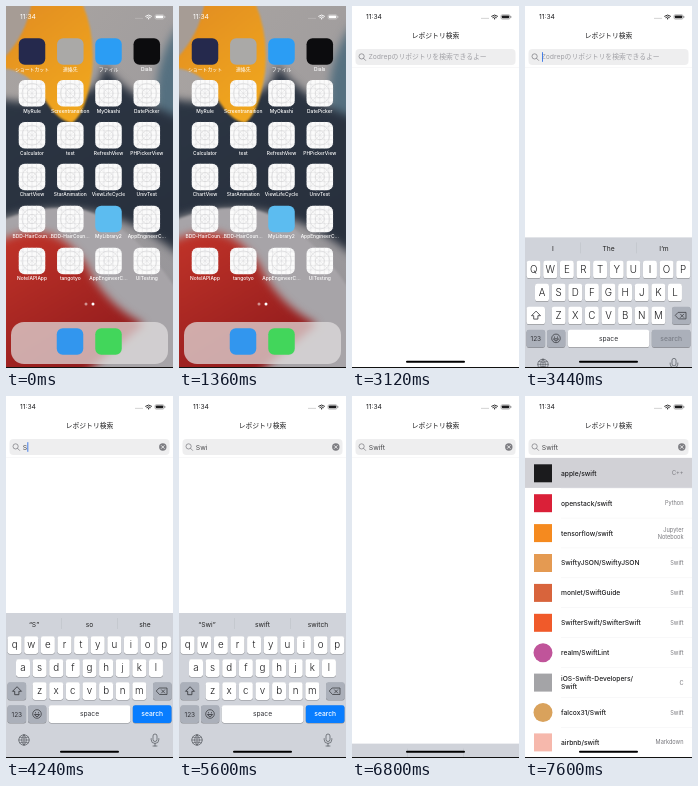
Write an HTML page that moves like this. It is 167 by 362 pixels and loops after 8000 ms.

```html
<!DOCTYPE html>
<html lang="ja">
<head>
<meta charset="utf-8">
<title>Repository search</title>
<style>
html, body { margin: 0; width: 100%; height: 100%; overflow: hidden; background: #fff; }
svg { display: block; width: 100vw; height: 100vh; }
text { font-family: Inter, "Noto Sans CJK JP", "Noto Sans CJK", sans-serif; white-space: pre; }
.soft { filter: blur(1px); }
.softer { filter: blur(4px); }
</style>
</head>
<body>
<svg id="stage" viewBox="0 0 167 362" preserveAspectRatio="none"></svg>
<script>
const LOOP = 8000, STEP = 80, W = 167, H = 362;
const stage = document.getElementById('stage');
const $ = id => document.getElementById(id);
const set = (id, attrs) => {
  for (const k in attrs) $(id).setAttribute(k, attrs[k]);
};
const toggle = (id, on) => set(id, { display: on ? 'inline' : 'none' });

const rect = (x, y, w, h, fill, r = 0, more = '') =>
  `<rect x="${x}" y="${y}" width="${w}" height="${h}" rx="${r}" fill="${fill}" ${more}/>`;
const circle = (x, y, r, fill, more = '') =>
  `<circle cx="${x}" cy="${y}" r="${r}" fill="${fill}" ${more}/>`;
const shape = (d, fill, more = '') => `<path d="${d}" fill="${fill}" ${more}/>`;
const line = (d, color, width = 0.7, more = '') =>
  `<path d="${d}" fill="none" stroke="${color}" stroke-width="${width}" stroke-linecap="round" stroke-linejoin="round" ${more}/>`;
const text = (s, x, y, size, fill, anchor = 'middle', more = '') =>
  `<text x="${x}" y="${y}" font-size="${size}" fill="${fill}" text-anchor="${anchor}" ${more}>${s}</text>`;
const gradient = (id, from, to) =>
  `<linearGradient id="${id}" x2=".6" y2="1"><stop stop-color="${from}"/><stop offset="1" stop-color="${to}"/></linearGradient>`;

// Critically damped spring from 0 to 1
const spring = (ms, rate) => {
  const x = Math.max(0, ms) * rate;
  return 1 - (1 + x) * Math.exp(-x);
};
const mix = (a, b, p) => a + (b - a) * p;

function statusBar(color) {
  return text('11:34', 22, 13.4, 6.7, color) +
    [130, 132, 134, 136].map(x => circle(x, 12.3, 0.5, color, 'opacity=".5"')).join('') +
    line('M139.6 10.2q3-2.6 6 0M140.8 11.5q1.8-1.6 3.6 0', color, 0.9) + circle(142.6, 12.8, 0.7, color) +
    rect(149, 8.7, 9, 4.4, 'none', 1.3, `stroke="${color}" stroke-width=".5" opacity=".6"`) +
    rect(149.8, 9.5, 7.4, 2.8, color, 0.7) + rect(158.6, 10.2, 0.6, 1.5, color);
}

// Home screen
const COLS = [26, 64.3, 102.5, 140.8];
const ICON = 26.5;
const LABELS = [
  'ショートカット', '連絡先', 'ファイル', 'Dials',
  'MyRule', 'Screentransition', 'MyOkashi', 'DatePicker',
  'Calculator', 'test', 'RefreshView', 'PHPickerView',
  'ChartView', 'StarAnimation', 'ViewLifeCycle', 'UnivTest',
  'BDD-HairCoun…', 'BDD-HairCoun…', 'MyLibrary2', 'AppEngineerC…',
  'NotelAPIApp', 'tangotyo', 'AppEngineerC…', 'UITesting'
];
const TILE_COLORS = { 0: '#25294d', 1: '#aaa9a7', 2: '#2b9df4', 3: '#0c0c0e', 18: '#5cbcf0' };

const tile = (x, y, fill) => rect(x - ICON / 2, y - ICON / 2, ICON, ICON, fill, 6);

function gridTile(x, y) {
  let d = '';
  for (const k of [-9, -4.5, 0, 4.5, 9]) d += `M${x + k} ${y - 13}v26M${x - 13} ${y + k}h26`;
  const ring = r => circle(x, y, r, 'none', 'stroke="#c9c9cc" stroke-width=".45"');
  return tile(x, y, '#fbfbfb') +
    line(d + `M${x - 11} ${y - 11}l22 22m0 -22l-22 22`, '#d6d6d9', 0.4) + ring(4.5) + ring(10);
}

function wallpaper() {
  return rect(0, 0, W, H, 'url(#grey)') +
    shape('M175 15Q142 60 152 125H175Z', '#557080', 'class="softer"') +
    shape('M-8 92Q30 102 58 84Q92 96 98 58Q122 92 175 112V250Q90 180 -8 214Z', 'url(#navy)', 'class="softer"') +
    shape('M-8 50Q14 36 26 -8H74Q90 26 86 66Q80 108 66 117Q48 114 34 84Q18 62 -8 62Z', 'url(#orange)', 'class="soft"') +
    shape('M-8 -8H26Q22 30 -8 58Z', '#a69c95', 'class="soft"') +
    shape('M-8 216Q40 196 78 204Q130 220 175 290V370H-8Z', '#a7a4a8', 'class="soft"') +
    shape('M-8 236Q46 208 80 258Q98 298 138 318Q100 350 70 375H-8Z', 'url(#red)', 'class="softer"');
}

function homeScreen() {
  let icons = '', labels = '';
  LABELS.forEach((name, i) => {
    const x = COLS[i % 4], y = 45.4 + 41.9 * Math.floor(i / 4);
    icons += TILE_COLORS[i] ? tile(x, y, TILE_COLORS[i]) : gridTile(x, y);
    labels += text(name, x, y + 19.3, 4.9, '#fff', 'middle', 'font-weight="500"');
  });
  return wallpaper() +
    rect(5, 316, 157, 42, '#e2e0e0', 13, 'opacity=".72"') +
    `<g id="icons">${icons}${tile(64, 335.5, '#3296ee')}${tile(102.5, 335.5, '#42d65b')}</g>` +
    `<g id="labels">${labels}${circle(80, 298, 1.5, '#fff', 'opacity=".5"')}${circle(87, 298, 1.5, '#fff')}</g>` +
    statusBar('#fff') + rect(0, 0, W, H, '#000', 0, 'id="dim"');
}

// Search results: name, language, avatar colour, round avatar
const ROWS = [
  ['apple/swift', 'C++', '#1b1b1d'],
  ['openstack/swift', 'Python', '#da2038'],
  ['tensorflow/swift', 'Jupyter|Notebook', '#f58a1f'],
  ['SwiftyJSON/SwiftyJSON', 'Swift', '#e49a52'],
  ['monlet/SwiftGuide', 'Swift', '#d8643c'],
  ['SwifterSwift/SwifterSwift', 'Swift', '#f05a2a'],
  ['realm/SwiftLint', 'Swift', '#c0549a', true],
  ['iOS-Swift-Developers/|Swift', 'C', '#a4a4a7'],
  ['falcox31/Swift', 'Swift', '#d9a25c', true],
  ['airbnb/swift', 'Markdown', '#f6b8ac']
];
const PITCH = 29.9;

function results() {
  let names = '', avatars = '';
  const block = (s, x, y, size, fill, anchor, gap, weight) => {
    const parts = s.split('|');
    return parts.map((part, i) =>
      text(part, x, y + size * 0.36 + (i - (parts.length - 1) / 2) * gap, size, fill, anchor,
        `font-weight="${weight}"`)).join('');
  };
  ROWS.forEach(([name, lang, color, round], i) => {
    const y = 77.3 + PITCH * i;
    names += block(name, 36, y, 6.7, '#1c1c1e', 'start', 8.6, 500) +
      block(lang, 158.5, y, 5.6, '#77777c', 'end', 7.2, 400) +
      rect(36, y + PITCH / 2 - 0.3, 131, 0.4, '#ededef');
    avatars += round ? circle(18, y, 9.5, color) : rect(9, y - 9, 18, 18, color);
  });
  return `<g id="list">${rect(0, 62, W, PITCH, '#d1d1d6', 0, 'id="selected"')}${names}</g><g id="avatars">${avatars}</g>`;
}

// Keyboard
const KEYS = {};
['qwertyuiop', 'asdfghjkl', 'zxcvbnm'].forEach((row, r) => {
  [...row].forEach((key, i) => {
    KEYS[key] = { x: [8.6, 17, 33.6][r] + 16.62 * i, y: 249 + 23 * r };
  });
});
const keycap = (x, y, w, fill, id = '') =>
  rect(x, y - 8.2, w, 17.7, '#898b90', 2.3) + rect(x, y - 8.7, w, 17.6, fill, 2.3, id);

function keyboard() {
  let s = rect(0, 217, W, 146, '#d0d3da');
  for (const i of [0, 1, 2]) s += text('', 28 + 55.5 * i, 231, 6.7, '#222', 'middle', `id="hint${i}"`);
  s += rect(55.6, 222, 0.4, 11, '#b7bac1') + rect(111, 222, 0.4, 11, '#b7bac1');
  for (const k in KEYS) {
    const { x, y } = KEYS[k];
    s += keycap(x - 7, y, 14, '#fff') + text(k, x, y + 3.3, 9.8, '#1c1c1e', 'middle', `id="key-${k}" font-weight="300"`);
  }
  const grey = '#abb0ba', ink = '#303136';
  return s + keycap(1.5, 295, 18.6, grey, 'id="shift"') + keycap(147, 295, 18.6, grey) +
    keycap(1.5, 318, 18.6, grey) + keycap(22, 318, 18.3, grey) +
    keycap(42.8, 318, 81.5, '#fff') + keycap(126.8, 318, 38.7, grey, 'id="go"') +
    line('M10.8 291l-4.3 4.3h2.2v3.4h4.2v-3.4h2.2z', ink, 0.8) +
    line('M153.5 292h7.5v6.5h-7.5l-3-3.2zM155.5 293.8l3.2 3.2m0 -3.2l-3.2 3.2', ink, 0.7) +
    text('123', 10.8, 320.6, 6.5, ink) + text('space', 83.5, 320.3, 6.7, ink) +
    text('search', 146.2, 320.3, 6.7, '#fff', 'middle', 'id="goText" font-weight="500"') +
    circle(31, 318, 4.3, 'none', `stroke="${ink}" stroke-width=".7"`) +
    line('M28.7 318.8q2.3 4 4.6 0zM29.5 316.6v.3M32.5 316.6v.3', ink, 0.8) +
    circle(18, 344, 5.2, 'none', 'stroke="#50535a" stroke-width=".7"') +
    line('M12.8 344h10.4M18 338.8v10.4M18 338.8q-5 5.2 0 10.4q5 -5.2 0 -10.4M13.8 341.2q4.2 1.6 8.4 0M13.8 346.8q4.2 -1.6 8.4 0', '#50535a', 0.6) +
    rect(147, 338, 4, 7.5, 'none', 2, 'stroke="#50535a" stroke-width=".7"') +
    line('M145.2 342.6v1.2q0 3.6 3.8 3.6t3.8 -3.6v-1.2M149 347.4v2.6m-2 0h4', '#50535a', 0.7) +
    '<g id="popup">' +
    shape('M-7 9V-8Q-7 -11 -10 -13Q-11.5 -15 -11.5 -17V-29Q-11.5 -32 -8.5 -32H8.5Q11.5 -32 11.5 -29V-17Q11.5 -15 10 -13Q7 -11 7 -8V9Z',
      '#fff', 'stroke="#b9bcc3" stroke-width=".4"') +
    text('', 0, -16, 15, '#1c1c1e', 'middle', 'id="popupText" font-weight="300"') + '</g>';
}

function searchPage() {
  const glass = '#85858a';
  return '<g id="page">' +
    text('レポジトリ検索', 83.5, 32.4, 6.8, '#1c1c1e', 'middle', 'font-weight="500"') +
    rect(3.5, 43, 160, 16, '#eeeeef', 4) + rect(0, 61.6, W, 0.4, '#ededef') +
    circle(9.6, 50.4, 2.6, 'none', `stroke="${glass}" stroke-width=".8"`) + line('M11.6 52.4l2 2', glass, 0.8) +
    text('Zodrepのリポジトリを検索できるよー', 16.5, 53.4, 6.8, '#a0a0a5', 'start', 'id="hintText"') +
    text('', 16.8, 53.5, 6.8, '#48484b', 'start', 'id="query"') +
    rect(17, 46.2, 0.9, 9.6, '#3472e6', 0, 'id="caret"') +
    `<g id="clear">${circle(156.8, 51, 3.7, '#7d7d82')}${line('M155.4 49.6l2.8 2.8m0 -2.8l-2.8 2.8', '#fff', 0.8)}</g>` +
    results() + '</g>';
}

stage.innerHTML = '<defs>' + gradient('grey', '#aaa5a2', '#98969a') + gradient('orange', '#e08a22', '#f0a61e') +
  gradient('navy', '#2c3644', '#28303d') + gradient('red', '#c23429', '#8f1a1c') +
  `<clipPath id="frame">${rect(0, 0, W, H, '#000', 0, 'id="frameRect"')}</clipPath></defs>` +
  `<g id="home">${homeScreen()}</g>` +
  `<g id="app"><g clip-path="url(#frame)">${rect(0, 0, W, 800, '#fff')}${statusBar('#1c1c1e')}${searchPage()}` +
  `<g id="keyboard">${keyboard()}</g>${rect(54, 354.8, 59, 2, '#000', 1, 'id="homeBar"')}</g></g>` +
  rect(0, 361, W, 1, '#111');

const OPEN = 2110, OPENED = 2880, READY = 3120, FOCUS = 3180, SEARCH = 6400, DISMISS = 6540;
const TYPED = [['S', 4000], ['w', 4560], ['i', 5040], ['f', 5840], ['t', 6160]];
const HINTS = [
  ['I', 'The', 'I’m'], ['“S”', 'so', 'she'], ['“Sw”', 'sweet', 'swim'],
  ['“Swi”', 'swift', 'switch'], ['“Swif”', 'swift', 'swiftly'], ['“Swift”', 'swiftly', 'swifts']
];

function drawLaunch(t) {
  const p = spring(t - OPEN, 0.0155), ph = spring(t - OPEN, 0.0125);
  const done = t >= OPENED, opening = t >= 2160;
  const w = done ? W : mix(ICON, W, p), h = done ? H : mix(ICON, H, ph);
  const x = done ? 0 : mix(140.8, W / 2, p) - w / 2;
  const y = done ? 0 : mix(213.5, H / 2, p) - h / 2;
  const scale = w / W, height = h / scale;
  toggle('home', !done);
  toggle('app', opening);
  set('app', {
    transform: `translate(${x} ${y}) scale(${scale})`,
    opacity: done ? 1 : Math.min(1, p * 3)
  });
  set('frameRect', { height, rx: done ? 0 : 21 });
  set('homeBar', { y: height - 7.2, opacity: done ? 1 : p });
  set('dim', { opacity: opening ? 0.3 * Math.min(1, p * 1.5) : 0 });
  set('labels', { opacity: opening ? Math.max(0, 1 - p * 2) : 1 });
  $('icons').style.filter = opening ? `blur(${2.4 * p}px)` : 'none';
}

function drawKeyboard(t, typed) {
  const raised = spring(t - FOCUS, 0.015) - spring(t - DISMISS, 0.015);
  set('keyboard', { transform: `translate(0 ${145 * (1 - raised)})` });
  toggle('keyboard', t >= FOCUS && t < 7040);
  const upper = typed === 0;
  for (const k in KEYS) $('key-' + k).textContent = upper ? k.toUpperCase() : k;
  HINTS[typed].forEach((s, i) => { $('hint' + i).textContent = t < DISMISS ? s : ''; });
  const pressed = t >= SEARCH && t < DISMISS;
  set('shift', { fill: upper ? '#fff' : '#abb0ba' });
  set('go', { fill: pressed ? '#fff' : upper ? '#abb0ba' : '#087dff' });
  set('goText', { fill: pressed ? '#222' : upper ? '#7b7f88' : '#fff' });

  const hit = TYPED.find(([, at]) => t >= at - 80 && t < at + 80);
  toggle('popup', hit);
  if (hit) {
    const { x, y } = KEYS[hit[0].toLowerCase()];
    set('popup', { transform: `translate(${x} ${y})` });
    $('popupText').textContent = hit[0];
  }
}

function draw(t) {
  drawLaunch(t);
  const entered = TYPED.filter(([, at]) => t >= at);
  const typed = entered.length;
  toggle('page', t >= READY);
  $('query').textContent = entered.map(e => e[0]).join('');
  toggle('hintText', !typed);
  toggle('clear', typed);

  const since = t - (typed ? entered[typed - 1][1] : FOCUS);
  set('caret', { x: 17 + (typed ? $('query').getComputedTextLength() : 0) });
  toggle('caret', t >= FOCUS && t < DISMISS && since % 1000 < 500);
  drawKeyboard(t, typed);
  toggle('list', t >= 7280);
  toggle('avatars', t >= 7520);
  toggle('selected', t >= 7600);
}

const start = performance.now();
function tick() {
  const t = (performance.now() - start) % LOOP;
  draw(Math.floor(t / STEP) * STEP);
  requestAnimationFrame(tick);
}
tick();
</script>
</body>
</html>
```
